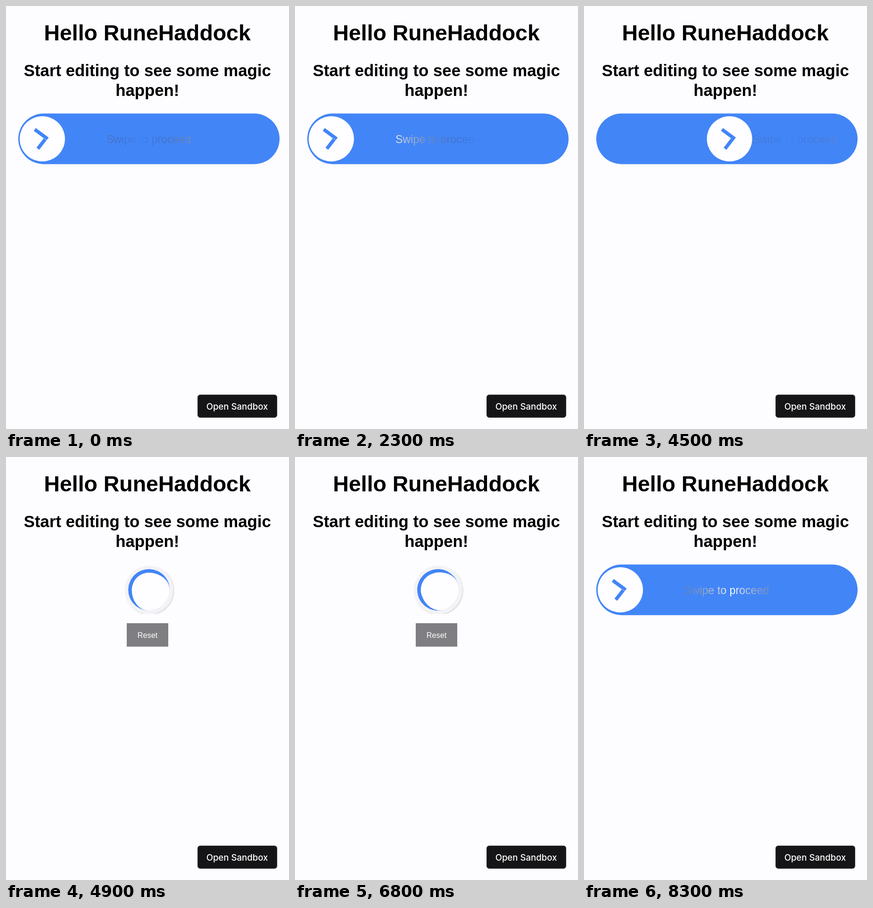
These frames come from a looping animation (600 by 898 pixels, 8.4 s). An HTML page:

```html
<!DOCTYPE html>
<html lang="en">
<head>
<meta charset="utf-8">
<title>Swipe button</title>
<style>
  html, body { margin: 0; width: 100%; height: 100%; overflow: hidden; background: #fdfcff; }
  svg { display: block; width: 600px; height: 898px; }
  text { font-family: "Liberation Sans", Arial, sans-serif; text-anchor: middle; }
  .title { font-weight: 700; font-size: 46.4px; }
  .subtitle { font-weight: 700; font-size: 34.8px; }
  .hint { font-size: 23.2px; }
  .reset { font-size: 16.2px; fill: #fff; }
  .open { font: 500 18.6px Inter, Roboto, sans-serif; fill: #fff; }
</style>
</head>
<body>
<svg viewBox="0 0 600 898">
  <defs>
    <linearGradient id="shimmer" gradientUnits="userSpaceOnUse" x1="0" x2="370" y1="0" y2="0" spreadMethod="repeat">
      <stop offset="0" stop-color="#000" stop-opacity="0"/>
      <stop offset=".5" stop-color="#fff"/>
      <stop offset="1" stop-color="#000" stop-opacity="0"/>
    </linearGradient>
    <filter id="shadow" x="-20%" y="-20%" width="140%" height="140%">
      <feDropShadow dx="1.2" dy="1.2" stdDeviation="1" flood-opacity=".2"/>
    </filter>
    <clipPath id="loaderBox"><rect x="240" y="231" width="130" height="102"/></clipPath>
  </defs>

  <text class="title" x="299.6" y="72.6">Hello RuneHaddock</text>
  <text class="subtitle" x="299.8" y="149.4">Start editing to see some magic</text>
  <text class="subtitle" x="299.8" y="191.4">happen!</text>

  <g id="slider">
    <rect x="26" y="228.3" width="554" height="107.4" rx="53.7" fill="#4285f7"/>
    <text id="hint" class="hint" x="302.7" y="291" fill="url(#shimmer)">Swipe to proceed</text>
    <g id="handle">
      <circle cx="77" cy="282" r="48" fill="#fefdff"/>
      <path d="M61 262 85.3 280 67.5 303" fill="none" stroke="#4285f7" stroke-width="7.4"/>
      <path id="seam" d="M80.5 281 87 285" stroke="#fefdff" stroke-width=".8" opacity=".7"/>
    </g>
  </g>

  <g id="loader">
    <g clip-path="url(#loaderBox)">
      <circle cx="303.5" cy="282.3" r="51.3" fill="#f3f2f6" filter="url(#shadow)"/>
    </g>
    <circle cx="303.2" cy="282" r="43.2" fill="#fefdff"/>
    <path id="spinner" fill="#4285f7" d="M44 0A44 44 0 1 0 0 44A36.5 44 0 0 1-36.5 0A36.5 36.5 0 0 1 0-36.5A44 36.5 0 0 1 44 0Z"/>
    <rect x="256" y="352.8" width="88" height="49.8" fill="#7f7e82"/>
    <text class="reset" x="300" y="384">Reset</text>
  </g>

  <rect x="406.75" y="825.75" width="167.5" height="47.5" rx="5" fill="#151416" stroke="#2b2a2d" stroke-width="1.5"/>
  <text class="open" x="490" y="856.5">Open Sandbox</text>
</svg>
<script>
  const LOOP = 8400;
  const DRAG_START = 4125, DRAG_END = 4865, RESET = 7700;
  const DRAG_LENGTH = 452, SHIMMER_SPEED = 0.206;
  const $ = id => document.getElementById(id);
  const [slider, hint, handle, seam, loader, spinner, shimmer] =
    ["slider", "hint", "handle", "seam", "loader", "spinner", "shimmer"].map($);

  const show = (node, visible) => node.setAttribute("display", visible ? "inline" : "none");
  const smooth = u => u * u * (3 - 2 * u);

  // Position of the transparent part of the text gradient.
  function shimmerX(t) {
    if (t < DRAG_START) return 283 + t * SHIMMER_SPEED;
    if (t < RESET) return 292 + (t - 4500) * SHIMMER_SPEED;
    return 128 + (t - 8300) * SHIMMER_SPEED;
  }

  function draw(t) {
    const loading = t >= DRAG_END && t < RESET;
    show(slider, !loading);
    show(loader, loading);
    if (loading) {
      const angle = (t - 4890) * 360 / 2000;
      spinner.setAttribute("transform", `translate(303.2 282) rotate(${angle})`);
      return;
    }
    const dragging = t >= DRAG_START && t < DRAG_END;
    const progress = dragging ? smooth((t - DRAG_START) / (DRAG_END - DRAG_START)) : 0;
    const x = progress * DRAG_LENGTH;
    handle.setAttribute("transform", `translate(${x} 0)`);
    hint.setAttribute("transform", `translate(${x * 0.622} 0)`);
    hint.setAttribute("opacity", 1 - 0.8 * progress);
    shimmer.setAttribute("gradientTransform", `translate(${shimmerX(t)} 0)`);
    show(seam, !dragging);
  }

  const start = performance.now();
  function tick() {
    draw((performance.now() - start) % LOOP);
    requestAnimationFrame(tick);
  }
  tick();
</script>
</body>
</html>
```
